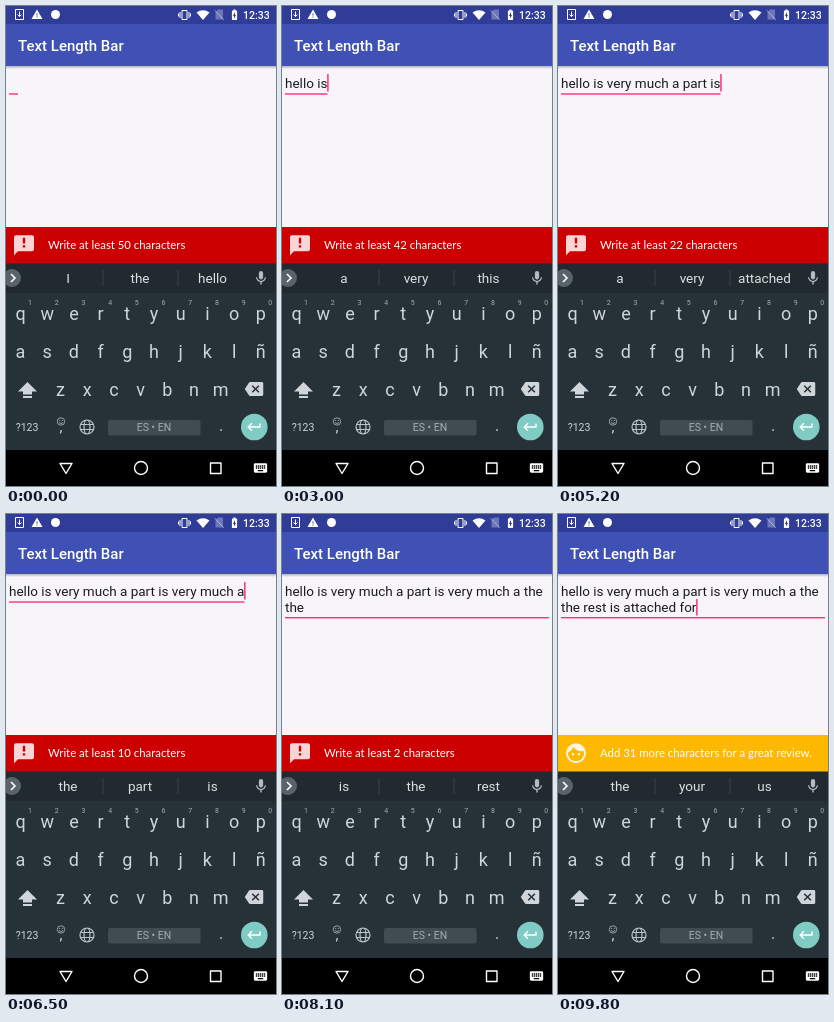
Write an HTML page with a canvas that moves like this. It is 270x480 px and loops after 9900 ms.

```html
<!DOCTYPE html>
<html lang="en">
<head>
<meta charset="utf-8">
<title>Text Length Bar</title>
<style>
html, body { margin: 0; width: 100%; height: 100%; overflow: hidden; background: #000; }
canvas { display: block; width: 270px; height: 480px; }
</style>
</head>
<body>
<canvas id="stage"></canvas>
<script>
const W = 270, H = 480, LOOP = 9900;
const canvas = document.getElementById('stage');
const ctx = canvas.getContext('2d');
const dpr = window.devicePixelRatio || 1;
canvas.width = W * dpr;
canvas.height = H * dpr;

const ROBOTO = 'Roboto, sans-serif';
const LABEL = 'Lato, sans-serif';
const KEY = '#cfd5d8';
const PINK = '#ff2f78';

// time, word added, suggestions shown next, whether its slot is seen pressed
const STEPS = [
  [-800, '', 'I the hello'],
  [1600, 'hello', 'I is and'],
  [2000, 'is', 'a very this'],
  [3400, 'very', 'good well much'],
  [3800, 'much', 'a for and', true],
  [4600, 'a', 'the part is', true],
  [4900, 'part', 'of and is', true],
  [5200, 'is', 'a very attached'],
  [5800, 'very', 'good well much'],
  [6200, 'much', 'a for and', true],
  [6500, 'a', 'the part is'],
  [7400, 'the', 'is the rest', true],
  [7600, 'the', 'is the rest'],
  [8300, 'rest', 'that is of'],
  [9000, 'is', 'a very attached'],
  [9400, 'attached', 'for to in', true],
  [9700, 'for', 'for to in'],
  [9800, '', 'the your us']
];
const SLOTS = [[20, 97], [97, 172], [172, 242]];
const CENTERS = [62, 134, 206.5];

const ICONS = {
  feedback: new Path2D('M20 2H4c-1.1 0-1.99.9-1.99 2L2 22l4-4h14c1.1 0 2-.9 2-2V4c0-1.1-.9-2-2-2zm-6.8 12.3h-2.4v-2.4h2.4v2.4zm0-4h-2.4V4.5h2.4v5.8z'),
  face: new Path2D('M9 11.75a1.25 1.25 0 1 0 0 2.5 1.25 1.25 0 0 0 0-2.5zm6 0a1.25 1.25 0 1 0 0 2.5 1.25 1.25 0 0 0 0-2.5zM12 2a10 10 0 1 0 0 20 10 10 0 0 0 0-20zm0 18c-4.41 0-8-3.59-8-8 0-.29.02-.58.05-.86 2.36-1.05 4.23-2.98 5.21-5.37C11.07 8.33 14.05 10 17.42 10c.78 0 1.53-.09 2.25-.26.21.71.33 1.47.33 2.26 0 4.41-3.59 8-8 8z'),
  mic: new Path2D('M12 14c1.66 0 3-1.34 3-3V5a3 3 0 0 0-6 0v6c0 1.66 1.34 3 3 3zm5.3-3c0 3-2.54 5.1-5.3 5.1S6.700 14 6.700 11H5c0 3.410 2.720 6.230 6 6.720V21h2v-3.280c3.280-.48 6-3.300 6-6.720h-1.700z'),
  backspace: new Path2D('M22 3H7c-.69 0-1.230.35-1.590.88L0 12l5.410 8.110c.36.53.9.89 1.590.89h15c1.100 0 2-.9 2-2V5c0-1.100-.9-2-2-2zm-3 12.590L17.590 17 14 13.410 10.410 17 9 15.590 12.590 12 9 8.410 10.410 7 14 10.590 17.590 7 19 8.410 15.410 12 19 15.590z'),
  enter: new Path2D('M19 7v4H5.830l3.580-3.590L8 6l-6 6 6 6 1.410-1.410L5.830 13H21V7z'),
  warning: new Path2D('M1 21h22L12 2 1 21zm12-3h-2v-2h2v2zm0-4h-2v-4h2v4z'),
  battery: new Path2D('M15.670 4H14V2h-4v2H8.330C7.600 4 7 4.600 7 5.330v15.330C7 21.400 7.600 22 8.330 22h7.330c.74 0 1.340-.6 1.340-1.330V5.330C17 4.600 16.400 4 15.670 4zM11 20v-5.500H9L13 7v5.500h2L11 20z'),
  keyboard: new Path2D('M20 5H4c-1.100 0-2 .9-2 2v10c0 1.100.9 2 2 2h16c1.100 0 2-.9 2-2V7c0-1.100-.9-2-2-2zm-9 3h2v2h-2V8zm0 3h2v2h-2v-2zM8 8h2v2H8V8zm0 3h2v2H8v-2zm-1 2H5v-2h2v2zm0-3H5V8h2v2zm9 7H8v-2h8v2zm0-4h-2v-2h2v2zm0-3h-2V8h2v2zm3 3h-2v-2h2v2zm0-3h-2V8h2v2z')
};

function rect(x, y, w, h, color) {
  ctx.fillStyle = color;
  ctx.fillRect(x, y, w, h);
}

function text(str, x, y, size, color, align = 'left', weight = 400, family = ROBOTO) {
  ctx.font = `${weight} ${size}px ${family}`;
  ctx.textAlign = align;
  ctx.fillStyle = color;
  ctx.fillText(str, x, y);
}

// Places a 24-unit icon centred on x, y
function icon(name, x, y, size, color) {
  ctx.save();
  ctx.translate(x - size / 2, y - size / 2);
  ctx.scale(size / 24, size / 24);
  ctx.fillStyle = color;
  ctx.fill(ICONS[name], 'evenodd');
  ctx.restore();
}

function disc(x, y, r, color) {
  ctx.beginPath();
  ctx.arc(x, y, r, 0, Math.PI * 2);
  ctx.fillStyle = color;
  ctx.fill();
}

function stroke(d, color, width) {
  ctx.strokeStyle = color;
  ctx.lineWidth = width;
  ctx.stroke(new Path2D(d));
}

function fill(d, color) {
  ctx.fillStyle = color;
  ctx.fill(new Path2D(d));
}

function drawStatusBar() {
  rect(0, 0, W, 18, '#2f3c98');
  stroke('M9.500 3.500h8v10h-8zM13.500 5.500v5M11.500 8.500l2 2 2-2', '#fff', 1);
  icon('warning', 31, 8.500, 12, '#fff');
  disc(49.500, 8.500, 4.500, '#fff');
  stroke('M176 4.500h5v9h-5zM174 6v6M183 6v6M172.500 7.500v3M184.500 7.500v3', '#fff', 1);
  fill('M190.500 6.500Q197 1.800 203.500 6.500L197 14z', '#fff');
  fill('M209.500 6l2.500-2.500h5v10h-7.500z', 'rgba(255,255,255,.3)');
  stroke('M208.500 4l9.500 10', 'rgba(255,255,255,.45)', 1);
  icon('battery', 228.500, 8.700, 12.500, '#fff');
  text('12:33', 237, 12.800, 10.5, '#fff', 'left', 500);
}

function drawToolbar() {
  rect(0, 18, W, 42, '#3f51b5');
  text('Text Length Bar', 12, 45, 15, '#fff', 'left', 500);
  const shade = ctx.createLinearGradient(0, 60, 0, 63);
  shade.addColorStop(0, 'rgba(0,0,0,.28)');
  shade.addColorStop(1, 'rgba(0,0,0,0)');
  rect(0, 60, W, 3, shade);
}

function wrap(words) {
  const lines = [''];
  ctx.font = `400 13.5px ${ROBOTO}`;
  for (const word of words) {
    const last = lines.length - 1;
    const longer = lines[last] ? lines[last] + ' ' + word : word;
    if (ctx.measureText(longer).width > 264) lines.push(word);
    else lines[last] = longer;
  }
  return lines;
}

function drawInput(words, cursorOn) {
  const lines = wrap(words);
  const row = lines.length - 1;
  const end = 3 + ctx.measureText(lines[row]).width;
  lines.forEach((line, i) => text(line, 3, 82 + i * 16, 13.5, '#1c1c1e'));
  const right = row ? 267 : Math.max(12, end);
  rect(3, 87.3 + row * 15.7, right - 3, 1.4, PINK);
  if (cursorOn) rect(end - 0.3, 68 + row * 17, 1.5, 17.5 - row, PINK);
}

function drawLengthBar(count) {
  const short = count < 50;
  rect(0, 221, W, 37, short ? '#cc0000' : '#ffb800');
  icon(short ? 'feedback' : 'face', 18, 239.300, 24, short ? '#fbd5d5' : '#fff6e0');
  const label = short
    ? `Write at least ${50 - count} characters`
    : `Add ${100 - count} more characters for a great review.`;
  text(label, 42, 243, 11.35, '#fff', 'left', 400, LABEL);
}

function drawSuggestions(list, pressed) {
  rect(0, 257.5, W, 29.500, '#212a2f');
  if (pressed >= 0) {
    const [a, b] = SLOTS[pressed];
    rect(a, 258, b - a, 29, 'rgba(255,255,255,.07)');
  }
  disc(6, 272, 9, '#58636a');
  stroke('M5 268l4 4-4 4', '#fff', 1.600);
  rect(96.500, 264, 1, 16, '#38434a');
  rect(171.500, 264, 1, 16, '#38434a');
  list.forEach((word, i) => text(word, CENTERS[i], 277, 13.5, '#dce0e2', 'center'));
  icon('mic', 255, 272, 17, '#b4bcc0');
}

function drawKeys() {
  rect(0, 287, W, 157, '#263238');
  const row = (letters, x, y) =>
    [...letters].forEach((c, i) => text(c, x + i * 26.700, y, 18, KEY, 'center'));
  row('qwertyuiop', 14.500, 314);
  row('asdfghjklñ', 14.500, 351.500);
  row('zxcvbnm', 54.500, 390);
  [...'1234567890'].forEach((c, i) =>
    text(c, 24 + i * 26.700, 299, 7, '#a4adb2', 'center'));

  fill('M21.500 376l9.500 9.500h-5v3h-9v-3h-5z', KEY);
  rect(17, 390, 9, 2, KEY);
  icon('backspace', 248, 383, 18.500, KEY);

  text('?123', 21, 425, 10.5, KEY, 'center');
  stroke('M58.700 415.500a3.700 3.700 0 1 1-7.400 0a3.700 3.700 0 1 1 7.400 0M53 416.500q2 2.200 4 0', '#a4adb2', 0.9);
  disc(53.700, 414.500, 0.6, '#a4adb2');
  disc(56.300, 414.500, 0.6, '#a4adb2');
  text(',', 55, 425.500, 15, KEY, 'center');
  stroke('M88 421a7 7 0 1 1-14 0a7 7 0 1 1 14 0M84 421a3 7 0 1 1-6 0a3 7 0 1 1 6 0M75 418.500h12M75 423.500h12', '#bcc4c8', 1.200);
  ctx.beginPath();
  ctx.roundRect(102, 414, 92.500, 15.500, 2);
  ctx.fillStyle = '#414c52';
  ctx.fill();
  text('ES • EN', 148, 425.300, 10.5, '#a3acb1', 'center');
  text('.', 215, 425, 16, KEY, 'center');
  disc(248.300, 421, 13.300, '#80cbc4');
  icon('enter', 248.300, 421, 17, '#fff');
}

function drawNavBar() {
  rect(0, 444, W, 36, '#000');
  ctx.lineJoin = 'round';
  stroke('M54 457.500h12l-6 10z', '#fff', 1.400);
  stroke('M141.500 462a6.500 6.500 0 1 1-13 0a6.500 6.500 0 1 1 13 0', '#fff', 1.400);
  stroke('M204.500 457h10.500v10.500h-10.500z', '#fff', 1.400);
  ctx.lineJoin = 'miter';
  icon('keyboard', 254.500, 462, 16, '#fff');
}

function draw(t) {
  const done = STEPS.filter(s => s[0] <= t);
  const now = done[done.length - 1];
  const next = STEPS[done.length];
  const words = done.map(s => s[1]).filter(Boolean);
  const list = now[2].split(' ');
  const pressed = next && next[3] && t >= next[0] - 100 ? list.indexOf(next[1]) : -1;
  const cursorOn = Math.floor((t - now[0]) / 500) % 2 === 0;

  ctx.setTransform(dpr, 0, 0, dpr, 0, 0);
  rect(0, 0, W, H, '#f7f5fa');
  drawStatusBar();
  drawToolbar();
  drawInput(words, cursorOn);
  drawLengthBar(words.join(' ').length);
  drawSuggestions(list, pressed);
  drawKeys();
  drawNavBar();
}

const start = performance.now();
function tick() {
  draw((performance.now() - start) % LOOP);
  requestAnimationFrame(tick);
}
tick();
</script>
</body>
</html>
```
